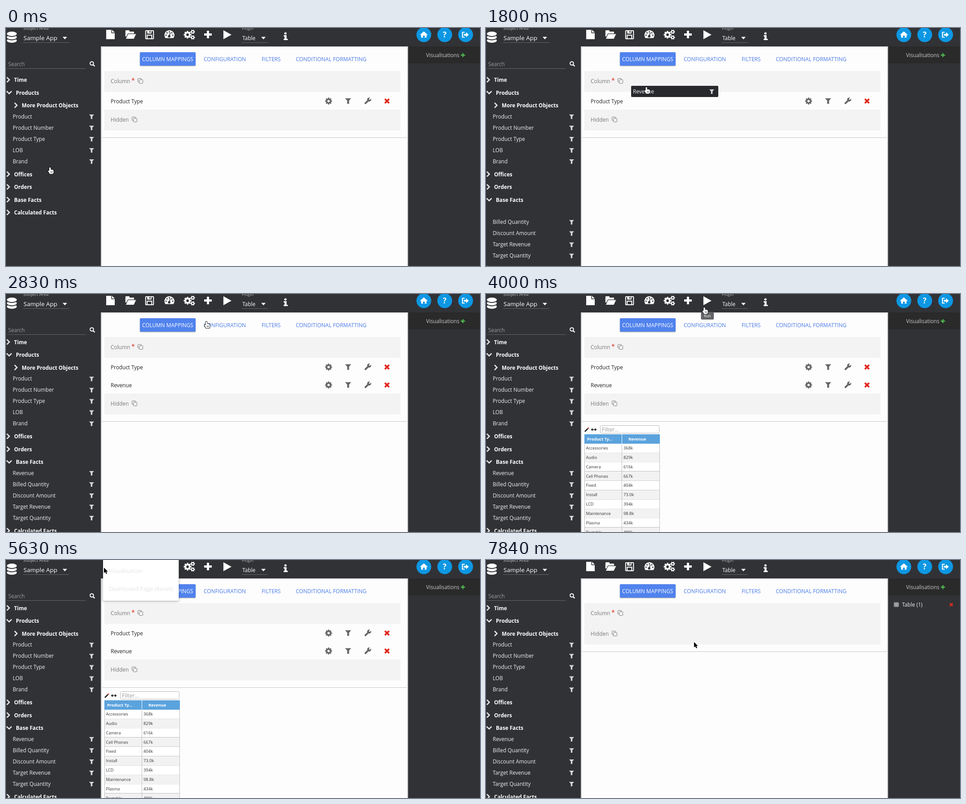
An HTML page with a canvas that plays this animation: 1055x531 px, repeating every 8 s.

```html
<!DOCTYPE html>
<html lang="en">
<head>
<meta charset="utf-8">
<title>Report builder</title>
<style>
html, body { margin: 0; width: 100%; height: 100%; overflow: hidden; background: #313236; }
canvas { display: block; }
</style>
</head>
<body>
<canvas id="stage" width="1055" height="531"></canvas>
<script>
const c = document.getElementById('stage').getContext('2d');
const LOOP = 8000, STEP = 146.6;
const DARK = '#313236', WHITE = '#fdfdfd', BAND = '#f3f3f3', BLUE = '#4a7be8', RED = '#e02b20';
const GREY = '#666', LIGHT = '#d8d8d8', RULE = '#66676b';
const PICK = 1505, HOVER = 1950, DROP = 2250, TIP = 3270, RUN = 3420, MENU = 5480, SELECT = 6960, RESET = 7250;
const clamp = v => Math.max(0, Math.min(1, v));
const smooth = p => p * p * (3 - 2 * p);

// ---- primitives ----
function text(s, x, y, size = 11.75, color = '#f0f0f0', weight = 400) {
  c.font = `${weight} ${size}px "Open Sans", "Noto Sans", sans-serif`;
  c.fillStyle = color;
  c.fillText(s, x, Math.round(y + size * 0.388));
}
function paint(fill, stroke, width = 1) {
  if (stroke) { c.strokeStyle = stroke; c.lineWidth = width; c.stroke(); }
  if (fill) { c.fillStyle = fill; c.fill(); }
}
function box(x, y, w, h, radius) { c.beginPath(); c.roundRect(x, y, w, h, radius); }
function rect(x, y, w, h, color, radius = 0) { box(x, y, w, h, radius); paint(color); }
function frame(x, y, w, h, color, width = 1, radius = 0) { box(x, y, w, h, radius); paint(null, color, width); }
function trace(p) {
  c.beginPath();
  for (let i = 0; i < p.length; i += 2) c.lineTo(p[i], p[i + 1]);
}
function poly(color, ...p) { trace(p); paint(color); }
function line(color, width, ...p) { trace(p); paint(null, color, width); }
function arc(x, y, r, color, width, from = 0, to = 2) {
  c.beginPath();
  c.arc(x, y, r, from * Math.PI, to * Math.PI);
  width ? paint(null, color, width) : paint(color);
}
const disc = (x, y, r, color) => arc(x, y, r, color);
function at(x, y, scale, draw, turn = 0) {
  c.save();
  c.translate(x, y);
  c.rotate(turn * Math.PI / 2);
  c.scale(scale, scale);
  draw();
  c.restore();
}
function shadowed(blur, draw) {
  c.save();
  c.shadowColor = 'rgba(0,0,0,.4)';
  c.shadowBlur = blur;
  c.shadowOffsetY = 1;
  draw();
  c.restore();
}
// Triangle pointing right, rotated by quarter turns.
const tri = (x, y, length, half, color, turn = 0) =>
  at(x, y, 1, () => poly(color, -length / 2, -half, length / 2, 0, -length / 2, half), turn);

// ---- icons ----
const funnel = (x, y, color, scale = 1) => at(x, y, scale, () => {
  tri(0, -2, 6, 5.5, color, 1);
  rect(-1.7, -2, 3.4, 7, color);
});
function plus(x, y, r, w, color) {
  rect(x - r, y - w / 2, 2 * r, w, color, 1);
  rect(x - w / 2, y - r, w, 2 * r, color, 1);
}
const cross = (x, y, r, w) => at(x, y, 1, () => plus(0, 0, r, w, RED), 0.5);
function gear(x, y, r, color, hole, teeth = 8) {
  disc(x, y, r * 0.76, color);
  for (let i = 0; i < teeth; i++) {
    const a = i * 2 * Math.PI / teeth;
    line(color, r * 0.42, x, y, x + r * Math.cos(a), y + r * Math.sin(a));
  }
  disc(x, y, r * 0.34, hole);
}
const wrench = (x, y) => at(x, y, 1, () => {
  rect(-9, -2, 13, 4, GREY, 2);
  disc(4.7, 0, 4.5, GREY);
  rect(5, -1.5, 6, 3, WHITE);
}, -0.5);
function copyIcon(x, y, color, bg) {
  for (const d of [-5.5, -2.5]) {
    rect(x + d, y + d, 8, 8, bg);
    frame(x + d, y + d, 8, 8, color, 1, 1);
  }
}
const chevron = (x, y, open) => at(x + 2 * open, y, 1, () => line('#e4e4e4', 2.6, -3, -5.5, 2.5, 0, -3, 5.5), +open);
function cursor(x, y, hand) {
  c.lineJoin = 'round';
  at(x, y, 1, () => {
    if (!hand) {
      trace([0, 0, 0, 12, 2.8, 9.5, 4.8, 14, 7, 13, 5, 8.7, 8.7, 8.7]);
      c.closePath();
      return paint('#000', '#fff', 2);
    }
    for (const outline of ['#000', null]) {
      const part = (...b) => { box(...b); paint('#fff', outline, 2); };
      part(-1.5, 0, 3, 10, 1.5);
      part(-4, 7, 6, 4, 2);
      part(-2, 5, 9.5, 9.5, 3);
    }
    for (const k of [1.5, 4]) rect(k, 8.5, 0.8, 4, '#000');
  });
  c.lineJoin = 'miter';
}

// Each is drawn around its own centre.
const TOOLS = [
  function file() {
    rect(-9.5, -10.5, 19, 21, '#fff');
    rect(2, -10.5, 8, 7.5, DARK);
    poly('#fff', 3.5, -10.5, 9.5, -4.5, 3.5, -4.5);
  },
  function folder() {
    rect(-10, -9.5, 9, 14, '#fff', 1);
    rect(-10, -6.5, 19, 11, '#fff', 1);
    trace([-4, -1, 13.5, -1, 8.5, 9.5, -9, 9.5]);
    c.closePath();
    paint('#fff', DARK, 2.5);
  },
  function save() {
    frame(-8.5, -8.5, 17.5, 18, '#fff', 2, 1);
    rect(-5, -9, 9.5, 7, '#fff');
    rect(0, -8, 2.5, 4, DARK);
    frame(-5, 1.5, 10, 8, '#fff', 2);
  },
  function dashboard() {
    arc(1, 1.5, 11, '#fff', 0, 0.8, 2.2);
    for (let a = 1; a <= 2; a += 0.25) disc(1 + 7.5 * Math.cos(a * Math.PI), 1.5 + 7.5 * Math.sin(a * Math.PI), 1.5, DARK);
    line(DARK, 1.7, 0.5, 4, 3, -4);
    disc(0.5, 4, 2.8, DARK);
  },
  function cogs() {
    gear(-2, 0.5, 8.5, '#fff', DARK);
    for (const y of [-6, 6.5]) gear(9.5, y, 5, '#fff', DARK, 6);
  },
  function add() { plus(0, 0, 8.5, 5, '#fff'); },
  function run() { tri(0, 0.5, 18, 10, '#fff'); }
];
const ROUND = [
  function home() {
    tri(0, -3.5, 8, 9, '#fff', 3);
    rect(-6, 0, 12, 6.5, '#fff');
    rect(-2, 2, 4, 4.5, '#0d97e3');
  },
  function help() { text('?', -4.3, -0.5, 17, '#fff', 700); },
  function leave() {
    line('#fff', 2.2, -2, -5.5, -7, -5.5, -7, 5.5, -2, 5.5);
    rect(-4, -2, 6, 4, '#fff');
    tri(4, 0, 6, 5.5, '#fff');
  }
];

// ---- page parts ----
function dropdown(caption, size, value, valueSize, x, width) {
  text(caption, x, size / 9 - 0.6, size, '#bbb');
  text(value, x + 1, 22, valueSize, '#fff');
  tri(x + width - 10, 22.5, 5.5, 5, '#fff', 1);
  rect(x, 32, width, 1, RULE);
}
function toolbar() {
  for (const y of [28, 20.5, 13]) {
    for (const [dy, color] of [[2, DARK], [0, '#fff']]) {
      c.beginPath();
      c.ellipse(13, y + dy, 11, 5, 0, 0, 7);
      paint(color);
    }
  }
  dropdown('Subject Area', 9.8, 'Sample App', 13.5, 38, 103);
  dropdown('Plugin', 9, 'Table', 11.85, 525, 58);
  TOOLS.forEach((icon, i) => at(232.5 + 43.4 * i, 14.5, 1, icon));
  disc(622, 12, 2.6, '#fff');
  rect(620, 16, 4.5, 11, '#fff');
  rect(618, 16, 4, 3, '#fff');
  rect(618, 24, 9, 3, '#fff');
  ROUND.forEach((icon, i) => {
    const x = 930 + 46.5 * i;
    disc(x, 15, 16.5, '#0d97e3');
    at(x, 15, 1, icon);
  });
}

function sidebar(t, q) {
  text('Search', 5, 80, 11.7, '#9b9b9d');
  rect(2, 90, 176, 1, RULE);
  arc(191, 79, 3.8, '#fff', 2);
  line('#fff', 2.4, 193.5, 81.5, 197.5, 85.5);

  const unfold = t < 920 ? 0 : clamp((q - 880) / 290);
  let y = t >= DROP ? 107 : 115.5;
  const head = (label, open = false, indent = 0) => {
    chevron(5 + indent, y, open);
    text(label, indent ? 35 : open ? 22 : 18, y, 11.7, '#fff', 700);
    y += 28.5;
  };
  const items = (labels, hidden) => labels.forEach((label, i) => {
    if (label === hidden) return;
    const row = y - 4 + 25 * i;
    text(label, 15, row);
    funnel(190.5, row + 1, LIGHT);
  });
  head('Time');
  head('Products', true);
  head('More Product Objects', false, 17);
  items(['Product', 'Product Number', 'Product Type', 'LOB', 'Brand']);
  y += 125;
  head('Offices');
  head('Orders');
  head('Base Facts', unfold > 0);
  c.save();
  box(0, y - 17, 211, 125 * unfold, 0);
  c.clip();
  items(['Revenue', 'Billed Quantity', 'Discount Amount', 'Target Revenue', 'Target Quantity'],
    t >= PICK && t < DROP && 'Revenue');
  c.restore();
  y += 125 * unfold;
  head('Calculated Facts');
}

function band(label, y, iconX, active) {
  const bg = active ? DARK : BAND;
  rect(219, y, 659, 46.5, bg);
  text(label, 233, y + 22.5, 11.85, active ? '#ddd' : '#777');
  copyIcon(iconX, y + 22, active ? '#111' : '#777', bg);
}

function editor(t) {
  rect(211, 41, 684, 500, '#c9c9cb');
  rect(213, 42, 680, 500, WHITE);
  shadowed(2, () => rect(298, 54, 124, 30, '#5183ee', 2));
  text('COLUMN MAPPINGS', 303, 69, 11.85, '#fff');
  text('CONFIGURATION', 440, 69, 11.85, BLUE);
  text('FILTERS', 569, 69, 11.85, BLUE);
  text('CONDITIONAL FORMATTING', 645, 69, 11.95, BLUE);

  band('Column', 96, 299, t >= HOVER && t < DROP);
  text('*', 279, 117, 14, RED);
  const rows = ['Product Type', 'Revenue'].slice(0, t >= RESET ? 0 : t >= DROP ? 2 : 1);
  rows.forEach((label, i) => {
    const y = 163 + 40 * i;
    text(label, 233, y, 11.75, '#222');
    gear(718, y, 7.7, GREY, WHITE);
    funnel(761.5, y, GREY, 1.25);
    wrench(805, y);
    cross(848, y, 6.8, 4);
  });
  const end = 142 + 40 * rows.length;
  band('Hidden', end, 286);
  rect(214, end + 62, 678, 1, '#c4c4c4');
}

function resultTable() {
  line('#222', 2.6, 220, 307, 227, 300);
  cross(228, 299, 2, 1);
  rect(236, 301.7, 8, 1.6, '#222');
  tri(235.5, 302.5, 4, 3.5, '#222', 2);
  tri(244.5, 302.5, 4, 3.5, '#222');
  rect(254, 293.5, 132, 17.5, '#fff', 3);
  frame(254.5, 293.5, 131, 17, '#b5b5b5', 1, 3);
  text('Filter...', 258, 302.5, 12, '#999');

  const data = 'Accessories:368k,Audio:829k,Camera:616k,Cell Phones:667k,Fixed:404k,Install:73.0k,LCD:394k,Maintenance:98.8k,Plasma:434k,Portable:480k';
  data.split(',').forEach((row, i) => {
    const y = 333.5 + 20.83 * i, line = Math.round(y + 20.3);
    const [name, value] = row.split(':');
    rect(219, y, 167, 20.83, i % 2 ? '#f2f2f2' : '#fff');
    rect(219, line, 167, 1, '#bdbdbd');
    text(name, 222.5, y + 10, 9.1, '#333');
    text(value, 306, y + 10, 9.3, '#333');
  });
  for (const x of [219, 302, 386]) rect(x, 334, 1, 200, '#bdbdbd');
  rect(219, 313, 168, 21, '#5ba3dd');
  rect(302, 313, 1, 21, '#fff');
  text('Product Ty...', 225, 323.5, 9.2, '#fff', 700);
  text('Revenue', 317, 323.5, 9.2, '#fff', 700);
}

function rightPanel(t) {
  rect(895, 41, 160, 38, '#2a2a2b');
  text('Visualisations', 935, 60.5, 11.7, '#c9c9c9');
  plus(1017, 60.5, 4.6, 2.8, '#4caf50');
  if (t < RESET) return;
  for (let i = 0; i < 9; i++) frame(908.5 + 3.2 * (i % 3), 95 + 3 * Math.floor(i / 3), 3.2, 3, '#ccc');
  text('Table (1)', 926, 99);
  cross(1035.5, 99.5, 4.6, 2.6);
}

function menu(t, q) {
  if (t < MENU || t >= RESET) return;
  const grow = clamp((q - 5330) / 240);
  const fade = clamp(1 - (q - 6930) / 290);
  c.save();
  c.globalAlpha = grow * fade;
  at(216, 0, grow, () => {
    shadowed(5, () => rect(0, -10, 168.5, 101, '#fff', 2));
    if (t < SELECT) return;
    rect(0, 4, 168.5, 40, '#c8c8c8');
    c.clip();
    disc(45, 24, 36 + Math.max(0, q - 6930) / 4, '#bdbdbd');
  });
  c.globalAlpha = clamp((q - 5585) / 190) * fade;
  text('Visualisation', 229, 24.5, 12.8, '#000');
  text('Dashboard Page (Reset)', 229, 64.5, 12.8, '#000');
  c.restore();
}

// ---- pointer: start, end, x, y, hand at arrival ----
const MOVES = [
  [0, 600, 60, 385, true],
  [1060, 1340, 45, 398, true],
  [1490, 1790, 357, 132, false],
  [2380, 3080, 486, 30, true],
  [4010, 4280, 514, 92, false],
  [4280, 5180, 218, 17, false],
  [5610, 5900, 267, 67, true],
  [6480, 6640, 262, 20, true],
  [6940, 7660, 463, 183, false]
];
function pointerAt(q) {
  let x = 98, y = 311, hand = true;
  for (const [start, end, toX, toY, kind] of MOVES) {
    const p = smooth(clamp((q - start) / (end - start)));
    x += (toX - x) * p;
    y += (toY - y) * p;
    if (p > 0.3) hand = kind;
  }
  return { x, y, hand };
}

function draw(t) {
  const q = Math.max(0, Math.floor((t - 35) / STEP) * STEP + 35);
  const { x, y, hand } = pointerAt(q);
  const dragging = t >= PICK && t < DROP, over = t >= HOVER;
  rect(0, 0, 1055, 531, DARK);
  toolbar();
  sidebar(t, q);
  editor(t);
  if (t >= RUN && t < RESET) resultTable();
  rightPanel(t);
  if (t >= TIP && t < 4140) {
    rect(478.5, 40, 28.5, 17, '#626366', 2);
    text('Run', 485, 48.5, 8.3, '#fff');
  }
  if (dragging) {
    const left = over ? 316 : x - 34, top = over ? 114.5 : y - 3;
    rect(left, top, 194, 25, over ? DARK : '#28292d', 2);
    text('Revenue', left + 4, top + 12);
    funnel(left + 179.5, top + 13, LIGHT);
  }
  menu(t, q);
  cursor(x, y, hand || (dragging && !over));
}

function tick() {
  draw(performance.now() % LOOP);
  requestAnimationFrame(tick);
}
tick();
</script>
</body>
</html>
```
